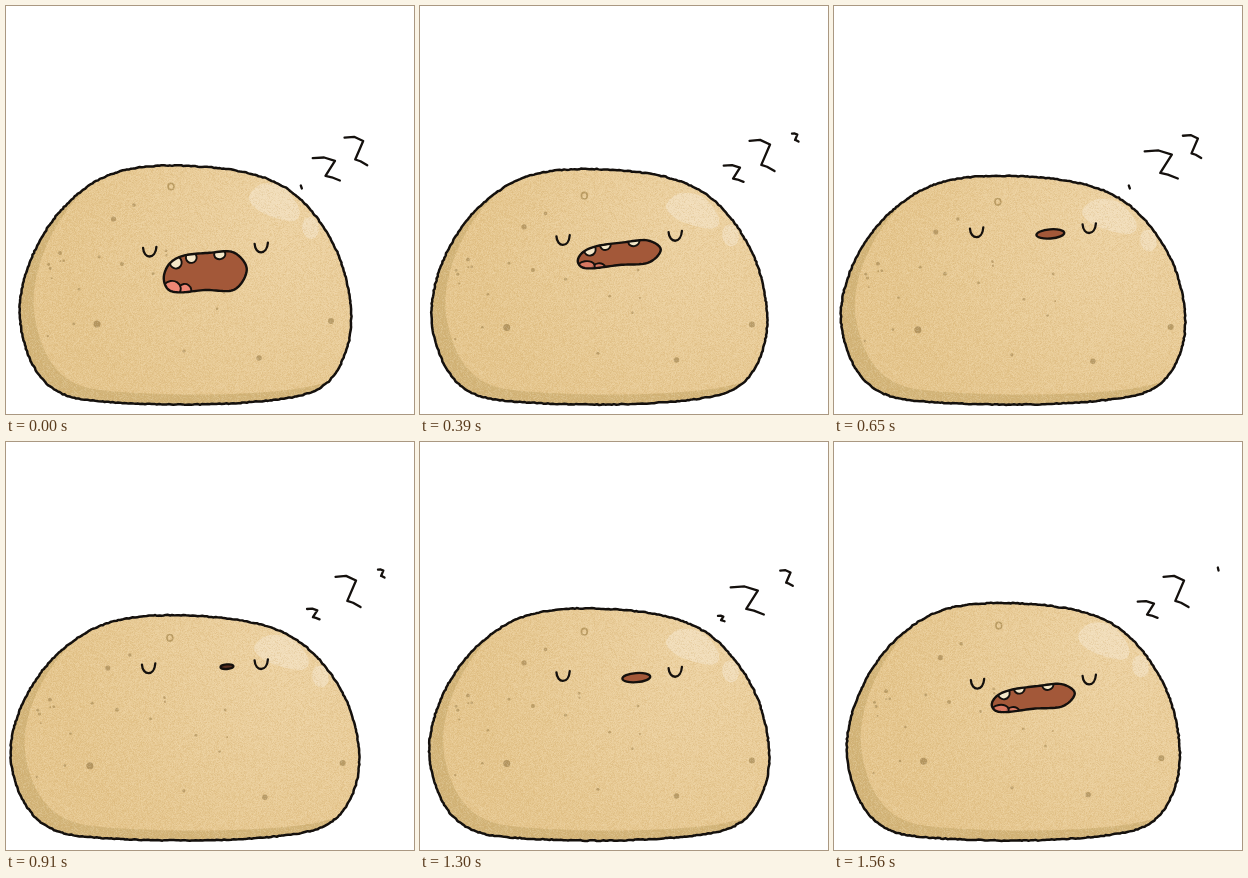
An HTML page with a canvas for the animation above (1690 ms loop, 408x408 px).

```html
<!DOCTYPE html>
<html lang="en">
<head>
<meta charset="utf-8">
<title>Sleeping potato</title>
<style>
  html, body { margin: 0; width: 100%; height: 100%; overflow: hidden; background: #fff; }
  canvas { display: block; width: 408px; height: 408px; }
</style>
</head>
<body>
<canvas id="stage" width="408" height="408"></canvas>
<script>
const SIZE = 408, STEP = 130, STEPS = 13, FLOOR = 398.5, MIDDLE = 179.5;
const INK = '#14100d';
const ctx = document.getElementById('stage').getContext('2d');

const potato = [[150, 160], [100, 170.5], [60, 199.5], [32, 239], [16.5, 283], [15.5, 322], [29, 362],
  [54, 386.5], [96, 395.5], [190, 398.5], [275, 393], [318, 379.5], [340, 346], [345, 303],
  [333, 250], [305, 204], [270, 176.5], [220, 163]];
const shine = [[243, 192], [256, 178], [278, 182], [293, 203], [287, 215], [257, 207]];
const bigSpots = [[91, 318, 3.5], [107.5, 213, 2.6], [128, 199, 1.8], [116, 258, 2], [54, 247, 1.9],
  [178, 345, 1.6], [253, 352, 2.7], [325, 315, 3]];
const lipForm = [[0, .62], [.07, .28], [.24, .08], [.55, .01], [.84, 0], [1, .42], [.85, .93],
  [.5, .94], [.2, 1], [.05, .92]];
const zed = [[0, .03], [.42, 0], [.82, .15], [.47, .8], [.7, .86], [1, 1]];

const clamp = x => Math.max(0, Math.min(1, x));

// Linear rise from `from`, hold at 1, linear fall ending at `to`
const swing = (i, from, rise, to, fall) => clamp(Math.min((i - from) / rise, (to - i) / fall));

function poseAt(i) {
  const face = swing(i, 1.5, 2.5, 13, 5);
  return {
    spread: swing(i, 2, 4, 12.5, 5),
    stretch: 1 + .08 * face,
    squash: 1 - .07 * face,
    eyeY: 250.5 - 19.3 * face,
    open: 1 - swing(i, 2, 3.5, 13, 3.5)
  };
}

function seeded(seed) {
  let s = (seed * 7919 + 12345) >>> 0;
  return () => {
    s = (s + 0x6D2B79F5) >>> 0;
    let t = Math.imul(s ^ (s >>> 15), 1 | s);
    t ^= t + Math.imul(t ^ (t >>> 7), 61 | t);
    return ((t ^ (t >>> 14)) >>> 0) / 4294967296;
  };
}

// Closed Catmull-Rom curve as a dense list of points
function smooth(points) {
  const out = [], n = points.length;
  points.forEach((b, i) => {
    const a = points[(i + n - 1) % n], c = points[(i + 1) % n], d = points[(i + 2) % n];
    const count = Math.max(5, Math.ceil(Math.hypot(c[0] - b[0], c[1] - b[1]) / 2.2));
    for (let k = 0; k < count; k++) {
      const t = k / count;
      out.push([0, 1].map(j => b[j] + .5 * t * (c[j] - a[j] +
        t * (2 * a[j] - 5 * b[j] + 4 * c[j] - d[j] + t * (3 * (b[j] - c[j]) + d[j] - a[j])))));
    }
  });
  return out;
}

function trace(points, closed = true) {
  const path = new Path2D();
  points.forEach(p => path.lineTo(p[0], p[1]));
  if (closed) path.closePath();
  return path;
}

function oval(x, y, rx, ry, angle = 0) {
  const path = new Path2D();
  path.ellipse(x, y, rx, ry, angle, 0, 2 * Math.PI);
  return path;
}

function ink(path, width, color = INK) {
  ctx.strokeStyle = color;
  ctx.lineWidth = width;
  ctx.stroke(path);
}

function fill(path, color) {
  ctx.fillStyle = color;
  ctx.fill(path);
}

function makeGrain() {
  const layer = document.createElement('canvas');
  layer.width = layer.height = SIZE;
  const g = layer.getContext('2d'), image = g.createImageData(SIZE, SIZE), random = seeded(4);
  for (let i = 0; i < image.data.length; i += 4) {
    const n = random() - random();
    image.data.set(n > 0 ? [255, 238, 205, n * 70] : [195, 150, 75, -n * 60], i);
  }
  g.putImageData(image, 0, 0);
  return layer;
}

function makeSpots() {
  const random = seeded(21), spots = [...bigSpots];
  for (let k = 0; k < 16; k++) {
    const across = random();
    spots.push([38 + 245 * across * across, 235 + 120 * random(), .9 + .6 * random()]);
  }
  return spots;
}

function makeGlow() {
  const glow = ctx.createRadialGradient(285, 215, 30, 285, 215, 230);
  glow.addColorStop(0, '#ecd1a1');
  glow.addColorStop(1, '#e5c68e');
  return glow;
}

const grain = makeGrain(), spots = makeSpots(), glow = makeGlow();

function drawBody(pose, random) {
  const left = 14.5 - 9 * pose.spread, right = 344.8 + 8.2 * pose.spread;
  const sx = (right - left) / 330, sy = 1 - .057 * pose.spread;
  const hull = ([x, y]) => [left + (x - 15) * sx, FLOOR - (FLOOR - y) * sy];
  const skin = ([x, y]) => [MIDDLE + (x - MIDDLE) * pose.stretch, 399 - (399 - y) * pose.squash];
  const outline = smooth(potato.map(hull));
  const shape = trace(outline);

  ctx.save();
  ctx.clip(shape);
  fill(shape, '#d3b57a');
  fill(trace(outline.map(([x, y]) => [x + 14, y - 10])), glow);
  fill(trace(smooth(shine.map(skin))), '#f1ddba');
  fill(oval(...skin([304.5, 222]), 8.3, 11, -.15), '#f1ddba');
  spots.forEach(([x, y, r]) => fill(oval(...skin([x, y]), r, r), `rgba(130, 102, 52, ${.36 + r * .04})`));
  ink(oval(...skin([165, 180.5]), 2.9, 3.3), 1.6, '#b99b62');
  ctx.drawImage(grain, 0, 0);
  ctx.restore();

  const wobble = v => v + (random() - .5) * .9;
  ink(trace(outline.map(p => p.map(wobble))), 2.5);
}

function drawEye(x, y) {
  const lid = new Path2D();
  lid.moveTo(x - 6.6, y - 8.5);
  lid.bezierCurveTo(x - 6, y + 2.7, x + 5.8, y + 3.4, x + 6.7, y - 9.7);
  ink(lid, 2.3);
}

function drawMouth({ open, eyeY }) {
  const h = 5 + 35 * open, w = Math.min(83, 13 + 105 * open);
  const cx = 225 - .31 * w, cy = eyeY - 9.7 + .64 * h;
  if (w < 40) {
    const lips = oval(cx, cy, w / 2, h * .46, -.08);
    fill(lips, open ? '#a35839' : '#5a3022');
    ink(lips, 2.3);
    return;
  }
  const x0 = cx - w / 2, y0 = cy - h / 2, y1 = cy + h / 2, k = w / 83;
  const slant = Math.min(.2, .7 * (1 - open));
  const lips = trace(smooth(lipForm.map(([x, y]) =>
    [x0 + x * w, y0 + (y * (1 - slant) + (1 - x) * slant) * h])));
  const blob = (x, y, rx, ry, color) => {
    const path = oval(x0 + x * k, y, rx * k, ry * k, -.15);
    fill(path, color);
    ink(path, 1.9);
  };
  ctx.save();
  ctx.clip(lips);
  fill(lips, '#a35839');
  const tongue = `rgba(238, 134, 116, ${open})`;
  blob(21, y1 - 2 * open, 6.5, 6.5 * open, tongue);
  blob(8, y1 - 3.5 * open, 9, 8 * open, tongue);
  blob(12, y0 + 10 * k, 5.9, 6.2, '#f4e7c9');
  blob(27.5, y0 + 5.2 * k, 5.4, 5.3, '#f4e7c9');
  blob(56, y0 + 2 * k, 5.6, 4.8, '#f4e7c9');
  ctx.restore();
  ink(lips, 2.4);
}

// Drifts up to the right, growing and shrinking; age runs from 0 to 12
function drawSnore(age) {
  const x = 295.5 + 5.6 * age + .15 * age * age, y = 181 - 4.5 * age;
  const grown = Math.sin(Math.PI * (age / 12) ** 1.15);
  const h = 3 + 28.5 * Math.max(0, grown) ** 1.4;
  const w = h * (age < 7 ? 1.18 : .8);
  const form = h < 4 ? [[.3, 0], [.6, 1]] : zed;
  ink(trace(form.map(([u, v]) => [x + (u - .5) * w, y + (v - .5) * h]), false), 2.3);
}

function draw(i) {
  const pose = poseAt(i);
  ctx.fillStyle = '#fff';
  ctx.fillRect(0, 0, SIZE, SIZE);
  ctx.lineCap = ctx.lineJoin = 'round';
  drawBody(pose, seeded(i + 1));
  drawEye(143.7 - (pose.stretch - 1) * 14, pose.eyeY);
  drawEye(255.2, pose.eyeY - 4.2);
  drawMouth(pose);
  for (const birth of [0, 5, 9]) drawSnore((i - birth + STEPS) % STEPS);
}

const start = performance.now();
let shown = -1;
function tick() {
  const i = Math.floor((performance.now() - start) / STEP) % STEPS;
  if (i !== shown) draw(shown = i);
  requestAnimationFrame(tick);
}
tick();
</script>
</body>
</html>
```
